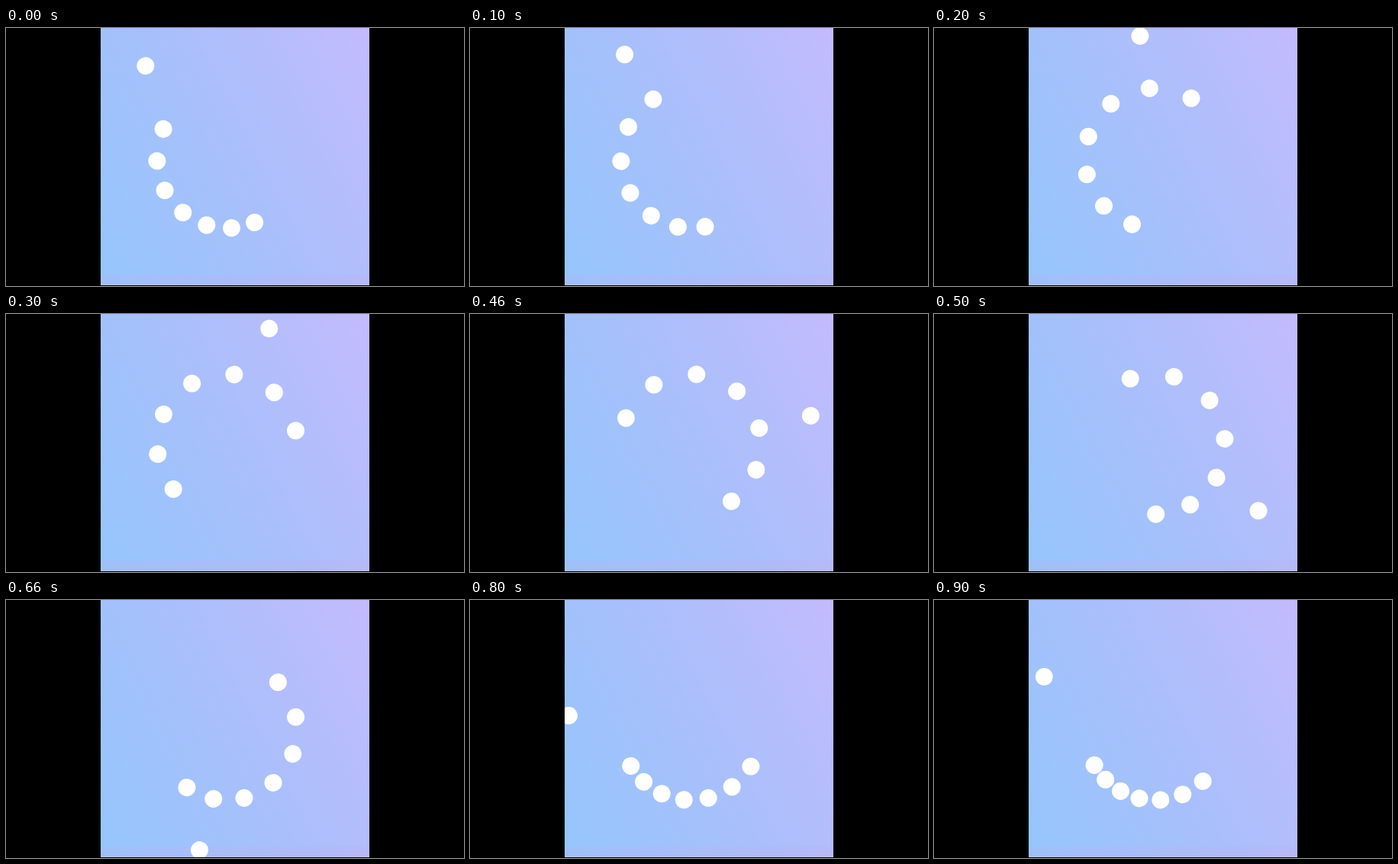
These frames come from a looping animation (600x338 px, 1000 ms). An HTML page without scripts:

```html
<!DOCTYPE html>
<html lang="en">
<head>
<meta charset="utf-8">
<title>Roller</title>
<style>
  @property --tick {
    syntax: "<integer>";
    inherits: true;
    initial-value: 0;
  }

  html, body {
    margin: 0;
    width: 100%;
    height: 100%;
    overflow: hidden;
    background: #000;
  }

  .panel {
    position: absolute;
    left: 124px;
    top: 0;
    width: 351.5px;
    height: 337px;
    overflow: hidden;
    background:
      linear-gradient(#d8d4fa88, #d8d4fa88) 0 100% / 100% 1px no-repeat,
      linear-gradient(#c8a8ec33, #c8a8ec33) 0 100% / 100% 14px no-repeat,
      linear-gradient(63deg, #95c6fc, #a9bffb 50%, #c3bbfe);
  }

  /* Whole 1/30 turns of the cycle, held for a tenth of the loop each */
  .roller {
    position: absolute;
    left: 165.2px;
    top: 170.2px;
    animation: tick 1s steps(10, jump-none) infinite;
  }

  @keyframes tick {
    from { --tick: 0; }
    to { --tick: 22; }
  }

  /* Closed form of cubic-bezier(.5, 0, .5, 1): v is time, u the curve parameter */
  .roller i {
    --v: calc(min(.083 + .03 * var(--n) + var(--tick) / 30, 1) - .5);
    --k: pow(4 * var(--v) + sqrt(16 * var(--v) * var(--v) + 1), 1 / 3);
    --u: calc((var(--k) - 1 / var(--k)) / 2);
    --ease: calc(.5 + 3 * var(--u) - 2 * var(--v));
    position: absolute;
    width: 23px;
    height: 23px;
    margin: -11.5px;
    border-radius: 50%;
    background: #fff;
    transform:
      rotate(calc(135deg + 15deg * var(--n) + 360deg * var(--ease)))
      translateY(var(--r, -91.7px));
  }
</style>
</head>
<body>
<div class="panel">
  <div class="roller">
    <i style="--n: 0; --r: 161.2px"></i>
    <i style="--n: 1"></i>
    <i style="--n: 2"></i>
    <i style="--n: 3"></i>
    <i style="--n: 4"></i>
    <i style="--n: 5"></i>
    <i style="--n: 6"></i>
    <i style="--n: 7"></i>
  </div>
</div>
</body>
</html>
```
